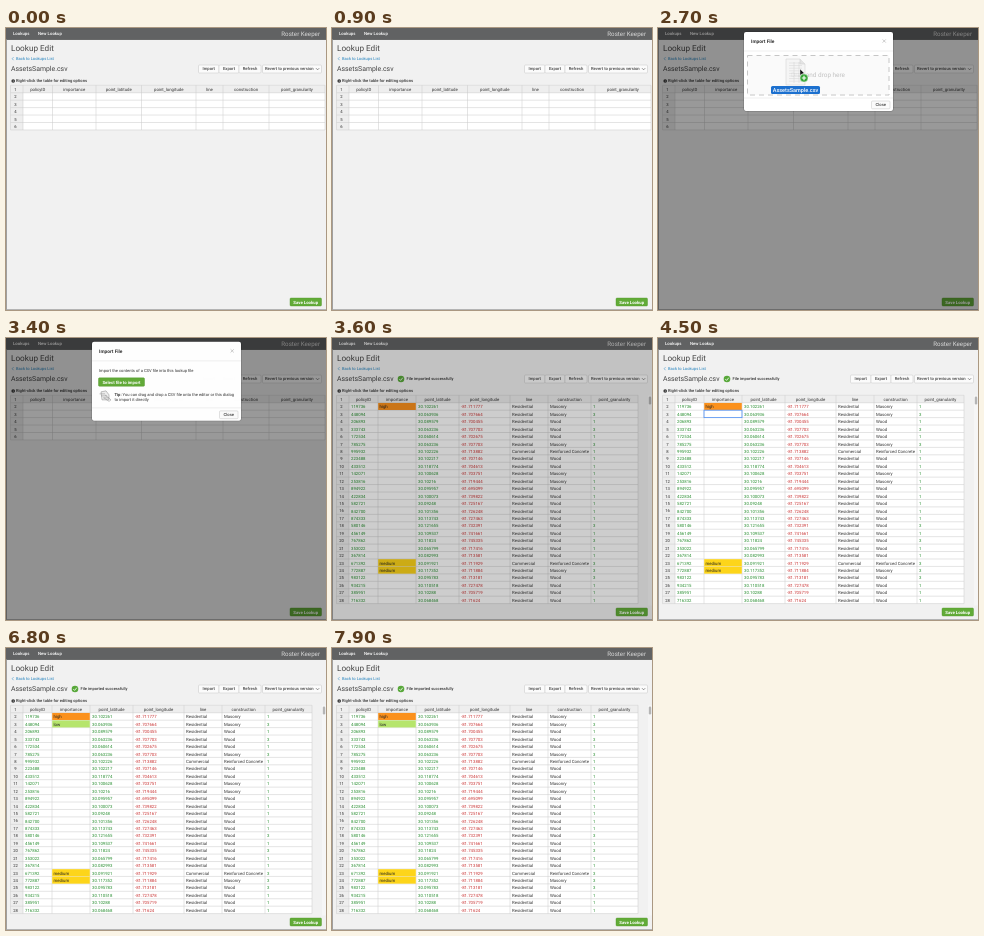
An HTML page for the animation above (8 s loop, 320x282 px).

```html
<!DOCTYPE html>
<html lang="en">
<head>
<meta charset="utf-8">
<title>Lookup import</title>
<style>
html, body { margin: 0; width: 100%; height: 100%; overflow: hidden; background: #f1f1f1; }
svg { display: block; width: 100%; height: 100%; }
text { font-family: Roboto, "Open Sans", sans-serif; text-rendering: geometricPrecision; white-space: pre; }
</style>
</head>
<body>
<svg id="stage" viewBox="0 0 320 282"></svg>
<script>
const LOOP = 8000, PITCH = 7.44, TOP = 57.3;

// Markup helpers
const rect = (x, y, w, h, fill, more = '') =>
  `<rect x="${x}" y="${y}" width="${w}" height="${h}" fill="${fill}" ${more}/>`;
const path = (d, stroke, width = 0.4, fill = 'none') =>
  `<path d="${d}" stroke="${stroke}" stroke-width="${width}" fill="${fill}"/>`;
// y is the visual middle of the line
const text = (x, y, s, size = 4.2, fill = '#333', more = '') =>
  `<text x="${x}" y="${y + size * 0.35}" font-size="${size}" fill="${fill}" ${more}>${s}</text>`;
const MID = 'text-anchor="middle"', MED = 'font-weight="500"', BOLD = 'font-weight="700"';
const group = (id, body, more = '') => `<g id="${id}" ${more}>${body}</g>`;

const button = (x, y, w, h, label, size = 4.2) =>
  rect(x, y, w, h, '#fbfbfb', 'rx="1" stroke="#c4c4c4" stroke-width=".5"') +
  text(x + w / 2, y + h / 2, label, size, '#444', `${MID} ${MED}`);
const greenButton = (x, y, w, h, label) =>
  rect(x, y, w, h, '#62ab38', 'rx="1" stroke="#4c9228" stroke-width=".4"') +
  text(x + w / 2, y + h / 2, label, 4.3, '#fff', `${MID} ${BOLD}`);

const HEADS = ['policyID', 'importance', 'point_latitude', 'point_longitude',
  'line', 'construction', 'point_granularity'];

// id, latitude, longitude, line, construction, granularity
const DATA = `
119736 30.102261 -81.711777 R M 1
448094 30.063936 -81.707664 R M 3
206893 30.089579 -81.700455 R W 1
333743 30.063236 -81.707703 R W 3
172534 30.060614 -81.702675 R W 1
785275 30.063236 -81.707703 R M 3
995932 30.102226 -81.713882 C RC 1
223488 30.102217 -81.707146 R W 1
433512 30.118774 -81.704613 R W 1
142071 30.100628 -81.703751 R M 1
253816 30.10216 -81.719444 R M 1
894922 30.095957 -81.695099 R W 1
422834 30.100073 -81.739822 R W 1
582721 30.09248 -81.725167 R W 1
842700 30.101356 -81.726248 R W 1
874333 30.113743 -81.727463 R W 1
580146 30.121655 -81.732391 R W 3
456149 30.109537 -81.741661 R W 1
767862 30.11824 -81.745335 R W 3
353022 30.065799 -81.717416 R W 1
367814 30.082993 -81.713581 R W 1
671392 30.091921 -81.711929 C RC 3
772887 30.117352 -81.711884 R M 3
983122 30.095783 -81.713181 R W 3
934215 30.110518 -81.727478 R W 1
385951 30.10288 -81.705719 R W 1
716332 30.068468 -81.71624 R W 1`.trim().split('\n').map(r => r.split(' '));
const LINES = { R: 'Residential', C: 'Commercial' };
const BUILDS = { M: 'Masonry', W: 'Wood', RC: 'Reinforced Concrete' };

const rowY = n => TOP + (n - 1) * PITCH;
const rowMid = n => rowY(n) + PITCH / 2 + 0.4;

function grid(edges, count) {
  const left = 4.5, right = edges[edges.length - 1], bottom = rowY(count + 1);
  let out = rect(left, TOP, right - left, bottom - TOP, '#fff') +
    rect(left, TOP, right - left, PITCH, '#eeeeee') +
    rect(left, TOP, edges[0] - left, bottom - TOP, '#eeeeee');
  let d = '';
  for (const x of [left, ...edges]) d += `M${x} ${TOP}V${bottom}`;
  for (let n = 1; n <= count + 1; n++) d += `M${left} ${rowY(n)}H${right}`;
  out += path(d, '#c9c9c9', 0.5);
  HEADS.forEach((h, i) =>
    out += text((edges[i] + edges[i + 1]) / 2, rowMid(1), h, 4.3, '#333', MID));
  for (let n = 1; n <= count; n++) out += text(9.5, rowMid(n), n, 4.2, '#333', MID);
  return out;
}

const FULL = [17, 46, 84, 127, 178, 216, 259, 306];
const tag = (n, label, fill) =>
  rect(46.2, rowY(n) + 0.2, 37.6, PITCH - 0.4, fill) + text(47.5, rowMid(n), label, 4.3, '#222');

function fullTable() {
  let out = grid(FULL, 28);
  DATA.forEach(([id, lat, lon, line, build, grain], i) => {
    const cells = [[0, id, '#2b8f33'], [2, lat, '#2b8f33'], [3, lon, '#c93434'],
      [4, LINES[line], '#333'], [5, BUILDS[build], '#333'], [6, grain, '#2b8f33']];
    for (const [c, s, fill] of cells) out += text(FULL[c] + 2, rowMid(i + 2), s, 4.3, fill);
  });
  return out + tag(2, 'high', '#fb911c') + tag(23, 'medium', '#fdd51a') + tag(24, 'medium', '#fdd51a') +
    rect(316, TOP, 4, 210, '#f6f6f6') + rect(316.8, 58.5, 2.4, 8, '#b5b5b5', 'rx="1.2"');
}

const page =
  rect(0, 0, 320, 282, '#f1f1f1') +
  rect(0, 0, 320, 11.5, '#616263') + rect(0, 11, 320, 0.7, '#4e4f50') +
  text(7, 5.2, 'Lookups', 4.3, '#fff', MED) + text(32, 5.2, 'New Lookup', 4.3, '#fff', MED) +
  text(314, 5.4, 'Roster Keeper', 6.2, '#d9d9d9', 'text-anchor="end"') +
  text(5, 20.3, 'Lookup Edit', 8.2, '#444') +
  path('M7.5 29.2L6.2 30.7L7.5 32.2', '#1d7fbd', 0.5) +
  text(10, 30.7, 'Back to Lookups List', 4.1, '#1d7fbd') +
  text(5, 41, 'AssetsSample.csv', 6.9, '#444') +
  button(192.5, 37, 20.5, 8, 'Import') + button(213, 37, 20, 8, 'Export') +
  button(233, 37, 22, 8, 'Refresh') + button(256.5, 37, 59, 8, '') +
  text(259, 41, 'Revert to previous version', 4.2, '#444', MED) +
  path('M310 40.2L311.6 41.8L313.2 40.2', '#444', 0.6) +
  '<circle cx="7.2" cy="53" r="1.8" fill="#333"/>' + text(7.2, 53, 'i', 2.8, '#fff', `${MID} ${BOLD}`) +
  text(10, 53, 'Right-click the table for editing options', 4.1, '#333', MED);

const success =
  '<circle cx="69" cy="41" r="3.3" fill="#58a83a"/>' +
  path('M67.3 41.1L68.6 42.4L70.8 39.7', '#fff', 0.8) +
  text(74.5, 41, 'File imported successfully', 4, '#333', MED);

const selection = rect(46, rowY(3), 38, PITCH, 'none', 'stroke="#5292f7" stroke-width=".8"');
const editor = rect(46, rowY(3), 38, PITCH, '#fff', 'stroke="#5292f7" stroke-width=".5"') +
  `<text id="typed" x="47.5" y="${rowMid(3) + 1.5}" font-size="4.3" fill="#222"></text>` +
  group('caret', rect(0, rowY(3) + 1.2, 0.5, PITCH - 2.2, '#111'));

const tip =
  text(93, 33, 'Import the contents of a CSV file into this lookup file', 4.1) +
  greenButton(92.5, 40, 46, 8.4, 'Select file to import') +
  path('M95 54L100 53L103 57V62L96 62Z', '#888', 0.5, '#eee') +
  path('M93.5 56H99M95 58H101M97 60H103M99 57L105 62L103 63.5L98 60', '#888', 0.5) +
  `<text x="108.5" y="57.7" font-size="4.1" fill="#333"><tspan ${BOLD}>Tip:</tspan> You can drag and drop a CSV file onto the editor or this dialog</text>` +
  text(108.5, 62, 'to import it directly', 4.1);

const zone = rect(89.5, 27.5, 141.5, 39.5, '#fafafa', 'stroke="#c6c6c6" stroke-width="1" stroke-dasharray="5 4"') +
  text(160, 47, 'Drag and drop here', 6.4, '#c2c2c2', MID);

const modal = rect(85.5, 3.5, 150, 80, '#000', 'rx="2.5" opacity=".25"') +
  rect(86, 4, 149, 79, '#fff', 'rx="2"') +
  path('M86 23H235M86 70H235', '#dedede', 0.5) +
  text(93, 13.2, 'Import File', 4.8, '#333', BOLD) +
  path('M224.6 11.4L227.8 14.6M227.8 11.4L224.6 14.6', '#aaa', 0.6) +
  button(213.5, 73, 18.5, 7.8, 'Close') + group('tip', tip) + group('zone', zone);

// Dragged file, placed relative to the pointer tip
function draggedFile() {
  let lines = '';
  for (let i = 0; i < 8; i++) lines += `M-11 ${-8 + i * 2.6}H2`;
  return `<g opacity=".75">` + path('M-14 -12H0L5 -7V14H-14Z', '#bdbdbd', 0.5, '#f4f4f4') +
    path(lines + 'M-6 -9V12M-1 -9V12', '#cfcfcf', 0.6) + path('M0 -12V-7H5', '#bbb', 0.5, '#ddd') + '</g>' +
    rect(-29, 15, 49, 8, '#1c70cf', 'rx="1.5"') +
    text(-4.5, 19, 'AssetsSample.csv', 5.5, '#fff', `${MID} ${MED}`) +
    path('M0 -2V4.4L1.5 3L2.6 5.4L3.7 4.9L2.6 2.6H4.6Z', '#fff', 0.4, '#111') +
    '<circle cx="4" cy="7" r="4" fill="#35a535" stroke="#fff" stroke-width=".4"/>' +
    path('M1.8 7H6.2M4 4.8V9.2', '#fff', 1.1);
}

document.getElementById('stage').innerHTML = page +
  group('empty', grid([17, 46.5, 90, 135.5, 190, 217, 263, 319], 6)) +
  group('filled', fullTable() + success) +
  group('low', tag(3, 'low', '#b6e56c')) + group('selection', selection) + group('editor', editor) +
  greenButton(284, 270, 31.5, 8, 'Save Lookup') +
  rect(0, 11, 0.8, 271, '#8d8d8d') + rect(0, 281.2, 320, 0.8, '#a5a5a5') +
  group('shade', rect(0, 0, 320, 282, '#000')) + group('modal', modal) + group('drag', draggedFile());

const el = id => document.getElementById(id);
const show = (id, on) => { el(id).style.display = on ? '' : 'none'; };
const ramp = (t, a, b) => Math.min(1, Math.max(0, (t - a) / (b - a)));

const DROP = 3100, LOADED = 3500, PICK = 4300, EDIT = 5200, COMMIT = 6400;
const KEYS = [5300, 5500, 5650];

function render(t) {
  const loaded = t >= LOADED, dragging = t >= 2000 && t < DROP;
  show('empty', !loaded);
  show('filled', loaded);

  const open = ramp(t, 950, 1100) * (1 - ramp(t, 3400, 3550));
  el('shade').setAttribute('opacity', 0.4 * ramp(t, 950, 1100) * (1 - ramp(t, 3500, 3700)));
  el('modal').setAttribute('opacity', open);
  el('modal').setAttribute('transform', `translate(0 ${-20 * (1 - open)})`);
  show('zone', dragging);
  show('tip', !dragging);

  show('drag', dragging);
  const far = (1 - ramp(t, 2000, 2700)) ** 2;
  el('drag').setAttribute('transform', `translate(${142 + 185 * far} ${43 + 65 * far})`);

  const editing = t >= EDIT && t < COMMIT;
  show('selection', t >= PICK && t < EDIT);
  show('editor', editing);
  show('low', t >= COMMIT);
  if (editing) {
    const typed = 'low'.slice(0, KEYS.filter(k => t >= k).length);
    el('typed').textContent = typed;
    const w = typed ? el('typed').getComputedTextLength() : 0;
    el('caret').setAttribute('transform', `translate(${47.8 + w} 0)`);
    show('caret', (t - EDIT) % 1000 < 600);
  }
}

const start = performance.now();
function tick() {
  render((performance.now() - start) % LOOP);
  requestAnimationFrame(tick);
}
tick();
</script>
</body>
</html>
```
